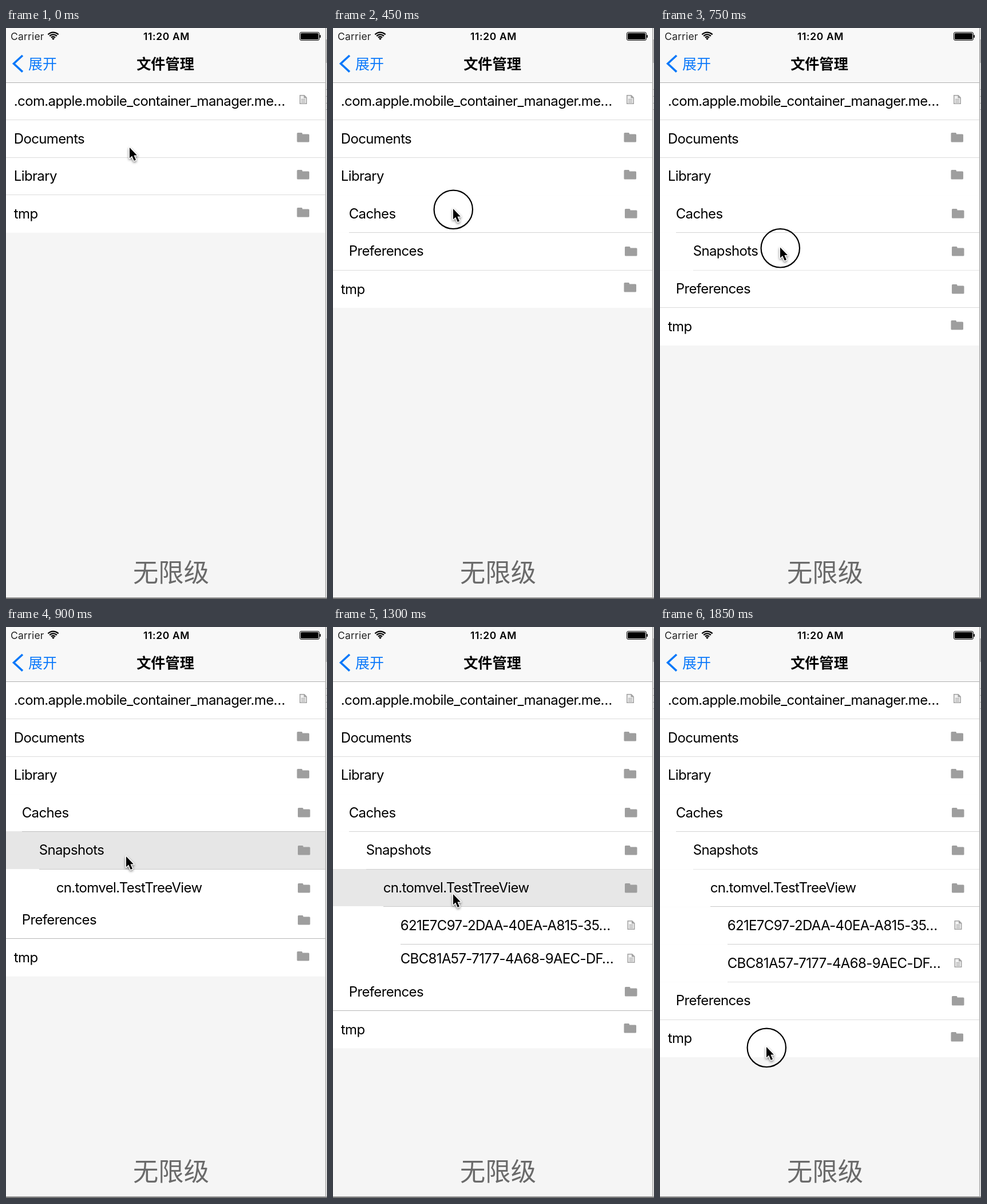
These frames come from a looping animation (561x998 px, 1.9 s). An HTML page with a canvas:

```html
<!DOCTYPE html>
<html lang="zh-CN">
<head>
<meta charset="utf-8">
<style>
html, body { margin: 0; width: 100%; height: 100%; overflow: hidden; }
canvas { display: block; }
</style>
</head>
<body>
<canvas id="stage" width="561" height="998"></canvas>
<script>
const c = document.getElementById('stage').getContext('2d');
const LOOP = 1900, STEP = 50, W = 558, TOP = 95, H = 65.7;
const LATIN = 'Inter, Roboto, sans-serif';
const HAN = '"Noto Sans CJK SC", "Noto Sans CJK", sans-serif';

// Tap times of the folders, in order
const LIB = 150, CACHE = 450, SNAP = 761.5, APP = 1158.4, PREF = 1570, TMP = 1850;
const taps = [LIB, CACHE, SNAP, APP, PREF, TMP];
const never = Infinity, always = -Infinity;

const row = (label, depth, born, tap, file = false) => ({ label, depth, born, tap, file });
const rows = [
  row('.com.apple.mobile_container_manager.me…', 0, always, never, true),
  row('Documents', 0, always, never),
  row('Library', 0, always, LIB),
  row('Caches', 1, LIB, CACHE),
  row('Snapshots', 2, CACHE, SNAP),
  row('cn.tomvel.TestTreeView', 3, SNAP, APP),
  row('621E7C97-2DAA-40EA-A815-35…', 4, APP, never, true),
  row('CBC81A57-7177-4A68-9AEC-DF…', 4, APP, never, true),
  row('Preferences', 1, LIB, PREF),
  row('tmp', 0, always, TMP)
];

// Pointer path: time, x, y
const path = [
  [0, 216, 209], [100, 213, 256], [200, 211, 265], [300, 210, 282], [400, 210, 314],
  [450, 210, 316], [550, 210, 325], [600, 210, 338], [700, 210, 378], [800, 210, 389],
  [900, 210, 401], [1050, 210, 447], [1200, 210, 456], [1300, 210, 467], [1400, 206, 535],
  [1500, 198, 630], [1600, 195, 655], [1650, 195, 655], [1700, 194, 665],
  [1800, 187, 728], [1850, 186, 734]
];

const clamp = v => Math.min(1, Math.max(0, v));
const grow = (r, t) => {
  const u = clamp((t - r.born - 60) / 104);
  return u * u * (3 - 2 * u);
};
const glow = (r, t) => t - r.tap < 40 ? 0 : clamp((186 - t + r.tap) / 72);

function rect(x, y, w, h, color) {
  c.fillStyle = color;
  c.fillRect(x, y, w, h);
}

function text(s, x, y, font, color, spacing = 0, align = 'left') {
  c.font = font;
  c.fillStyle = color;
  c.letterSpacing = spacing + 'px';
  c.textAlign = align;
  c.fillText(s, x, y);
}

function poly(points, color) {
  c.beginPath();
  for (const [x, y] of points) c.lineTo(x, y);
  c.closePath();
  c.fillStyle = color;
  c.fill();
}

function folder(x, y) {
  c.fillStyle = '#9e9e9e';
  c.beginPath();
  c.roundRect(x, y, 9.5, 8, 1.5);
  c.roundRect(x, y + 2.5, 21.5, 14, 1.5);
  c.fill();
}

function sheet(x, y) {
  poly([[x, y], [x + 8.5, y], [x + 13, y + 4.5], [x + 13, y + 16], [x, y + 16]], '#a2a2a2');
  poly([[x + 1.5, y + 1.5], [x + 7.5, y + 1.5], [x + 7.5, y + 5.5], [x + 11.5, y + 5.5],
    [x + 11.5, y + 14.5], [x + 1.5, y + 14.5]], '#f0f0f0');
  for (const dy of [7, 9.5, 12]) rect(x + 3, y + dy, 7, 1.2, '#aaa');
}

function drawRow(r, y, t, moving) {
  const nested = r.depth > 0, hot = glow(r, t);
  const left = nested ? 30 * r.depth - 2 : 0;
  const top = Math.round(y - 0.7), bottom = Math.round(y + H - 0.7);
  rect(0, y, W, H, '#fff');
  if (hot === 1) rect(0, top, W, bottom + 1 - top, '#d8d8d8');
  else {
    rect(0, top, W, bottom - top, `rgba(0,0,0,${hot * 0.15})`);
    if (!nested && r !== rows[0]) rect(0, top, W, 1, moving && r.tap === TMP ? '#b8b8b8' : '#dcdcdc');
    if (nested && r.tap !== PREF) rect(left, bottom, W - left, 1, '#c9c9c9');
  }
  text(r.label, nested ? left - 0.3 : 13.8, y + (nested ? 40.6 : 41), '24px ' + LATIN, '#000', -0.64);
  const iconY = Math.round(y + (nested ? 24.3 : 22));
  if (r.file) sheet(nested ? 514.5 : 513, iconY);
  else folder(nested ? 510 : 508.5, iconY);
}

function drawList(t) {
  let y = TOP;
  const shown = [];
  for (const r of rows) {
    const p = grow(r, t);
    if (p > 0) shown.push({ r, y, p });
    y += H * p;
  }
  // Unfolding rows slide out from beneath the settled ones
  const opening = shown.filter(s => s.p < 1).reverse();
  const settled = shown.filter(s => s.p === 1).sort((a, b) => (glow(a.r, t) === 1) - (glow(b.r, t) === 1));
  for (const s of [...opening, ...settled]) drawRow(s.r, s.y, t, opening.length > 0);
}

function drawHeader() {
  rect(0, 0, W, 95, '#f8f8f8');
  rect(0, 95, W, 1, '#b0b0b0');
  text('Carrier', 8, 21, '17.5px ' + LATIN, '#222', 0.2);
  text('11:20 AM', 280.5, 21, '600 17.5px ' + LATIN, '#000', 0.6, 'center');

  c.strokeStyle = '#000';
  c.lineWidth = 2.4;
  for (const r of [4.8, 8.6, 12.4]) {
    c.beginPath();
    c.arc(82.5, 20, r, -Math.PI * 0.76, -Math.PI * 0.24);
    c.stroke();
  }
  poly([[82.5, 21], [80, 18.3], [82.5, 17.3], [85, 18.3]], '#000');

  c.lineWidth = 1;
  c.beginPath();
  c.roundRect(513.5, 7.5, 34, 14, 2.5);
  c.stroke();
  c.fillStyle = '#000';
  c.beginPath();
  c.roundRect(515, 9, 31, 11, 1.5);
  c.roundRect(548.3, 12, 1.7, 5, 1);
  c.fill();

  c.strokeStyle = '#0a78fa';
  c.lineWidth = 3.6;
  c.beginPath();
  c.moveTo(29, 48);
  c.lineTo(13.5, 62.3);
  c.lineTo(29, 76.6);
  c.stroke();
  text('展开', 39, 71.5, '25px ' + HAN, '#0a78fa');
  text('文件管理', 278.5, 71.5, '700 25.2px ' + HAN, '#000', 0, 'center');
}

function drawEdges() {
  rect(W, 0, 3, 998, '#dedede');
  rect(W, 20, 3, 41, '#b5b5b5');
  rect(W, 0, 1, 998, '#a0a0a0');
  for (const y of [107, 119, 131, 142]) rect(W, y, 3, 1, '#aaa');
  rect(0, 995, 561, 1, '#b0b0b0');
  rect(0, 996, 561, 2, '#777');
}

function drawPointer(t) {
  const i = Math.max(1, path.findIndex(k => k[0] >= t));
  const [a, b] = [path[i - 1], path[i]];
  const u = (t - a[0]) / (b[0] - a[0]);
  const x = a[1] + (b[1] - a[1]) * u, y = a[2] + (b[2] - a[2]) * u;

  if (taps.some(k => Math.abs(t - k) < 25)) {
    c.strokeStyle = '#000';
    c.lineWidth = 2.2;
    c.beginPath();
    c.arc(x + 0.3, y + 1.3, 33.7, 0, 7);
    c.stroke();
  }
  c.save();
  c.translate(x, y);
  const arrow = [[0, 0], [0, 18.5], [4.2, 14.6], [7.8, 23], [11, 21.6], [7.4, 13.4], [13, 13.4]];
  c.shadowColor = 'rgba(0,0,0,.4)';
  c.shadowBlur = 4;
  c.shadowOffsetY = 2;
  c.lineJoin = 'round';
  c.lineWidth = 3;
  c.strokeStyle = '#fff';
  poly(arrow, '#fff');
  c.stroke();
  c.shadowColor = 'transparent';
  poly(arrow, '#000');
  c.restore();
}

function frame(now) {
  const t = Math.floor(now % LOOP / STEP) * STEP;
  rect(0, 0, 561, 998, '#f5f5f5');
  drawList(t);
  drawHeader();
  text('无限级', 288.5, 967.5, '44.3px ' + HAN, '#6a6a6a', 0, 'center');
  drawEdges();
  drawPointer(t);
  requestAnimationFrame(frame);
}

requestAnimationFrame(frame);
</script>
</body>
</html>
```
